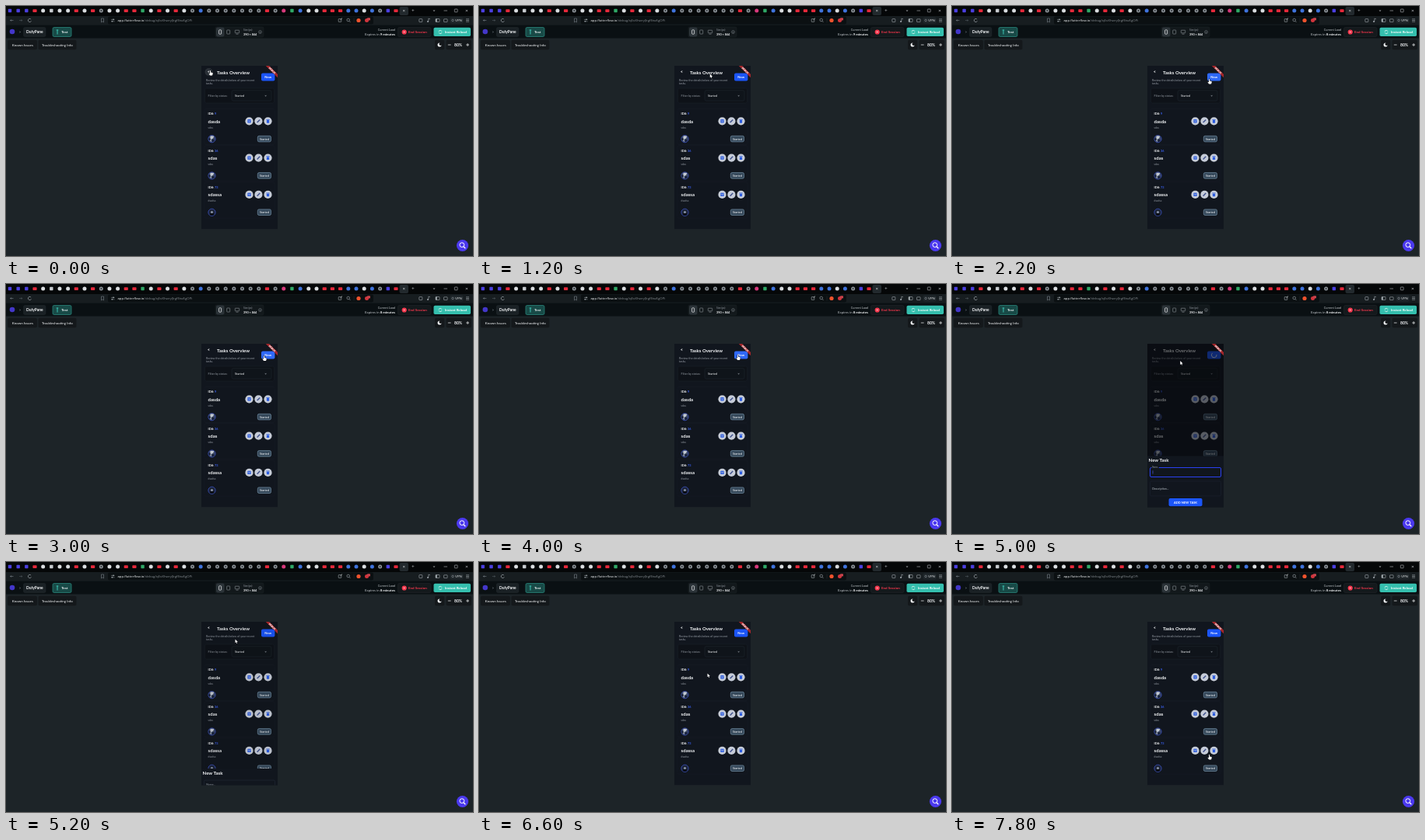
These frames come from a looping animation (600 px wide and 322 px high, 8 s). An HTML page with a canvas:

```html
<!DOCTYPE html>
<html lang="en">
<head>
<meta charset="utf-8">
<title>Tasks Overview</title>
<style>
html, body { margin: 0; width: 100%; height: 100%; overflow: hidden; background: #1d2428; }
canvas { display: block; width: 100vw; height: 100vh; }
</style>
</head>
<body>
<canvas id="stage"></canvas>
<script>
const W = 600, H = 322, LOOP = 8000, STEP = 200;
const canvas = document.getElementById('stage');
const c = canvas.getContext('2d');
const ratio = window.devicePixelRatio || 1;
canvas.width = W * ratio;
canvas.height = H * ratio;

const PHONE = { x: 251, y: 77, w: 98, h: 210.5 };
const SHEET_H = 66;
const BG = '#11161e', BLUE = '#1b55f8', GREY = '#949ba3', WHITE = '#f6f8fa';

// ---------- helpers ----------
function box(x, y, w, h, r, fill, line, lw = 0.5) {
  c.beginPath();
  c.roundRect(x, y, w, h, r);
  if (fill) { c.fillStyle = fill; c.fill(); }
  if (line) { c.strokeStyle = line; c.lineWidth = lw; c.stroke(); }
}

function disc(x, y, r, fill, line, lw = 0.6) {
  c.beginPath();
  c.arc(x, y, r, 0, 7);
  if (fill) { c.fillStyle = fill; c.fill(); }
  if (line) { c.strokeStyle = line; c.lineWidth = lw; c.stroke(); }
}

function path(points, line, lw = 0.7, fill) {
  c.beginPath();
  points.forEach(([x, y], i) => i ? c.lineTo(x, y) : c.moveTo(x, y));
  if (fill) { c.closePath(); c.fillStyle = fill; c.fill(); }
  if (line) { c.strokeStyle = line; c.lineWidth = lw; c.stroke(); }
}

// Draws text centred vertically on y and returns its right edge.
function text(str, x, y, size, color = WHITE, weight = 400, align = 'left', font = 'Lato') {
  c.font = `${weight} ${size}px "${font}", sans-serif`;
  c.textAlign = align;
  c.fillStyle = color;
  c.fillText(str, x, y + size * 0.35);
  return x + c.measureText(str).width;
}

function chevron(x, y, dx, dy, color, lw) {
  path([[x - dx - dy, y - dy - dx], [x + dx, y + dy], [x - dx + dy, y - dy + dx]], color, lw);
}

// ---------- browser ----------
const TABS = 'ppprwswwrwrgwwrrnwrwrwgbgggggggrgmnbwwrrrbbwbgpr';
const TINT = { p: '#4b3fe0', r: '#e5283a', w: '#d9dcdf', s: '#c8ccd0', b: '#3f73dc', g: '#8b9197', m: '#d8397c', n: '#2fa866' };

function drawTabs() {
  c.fillStyle = '#050708';
  c.fillRect(0, 0, W, 13);
  box(505.5, 1, 11.5, 11, 2, '#22292d');
  [...TABS].forEach((k, i) => {
    const x = i <= 36 ? 5 + 10.66 * i : 388.8 + 10.2 * (i - 36);
    if (k === 'r') box(x - 2.6, 4.2, 5.2, 3.8, 0.8, TINT.r);
    else if (k === 'p' || k === 's' || k === 'n') box(x - 2.2, 3.8, 4.4, 4.4, 0.8, TINT[k]);
    else disc(x, 6, 2.5, TINT[k]);
    if (k === 'g') disc(x, 6, 0.9, '#24292d');
  });
  text('×', 511.3, 6, 6, '#dfe2e4', 400, 'center');
  text('+', 523, 6, 6.5, '#b9bdc0', 400, 'center');
  chevron(550, 6, 0, 0.9, '#b9bdc0', 0.6);
  path([[562.5, 6], [567, 6]], '#b9bdc0', 0.6);
  box(576.3, 4, 3.8, 3.8, 0.5, null, '#b9bdc0', 0.6);
  text('×', 592, 6, 6.5, '#c6cacd', 400, 'center');
}

function drawToolbar() {
  const ink = '#a4abb0', dim = '#778086';
  c.fillStyle = '#171d20';
  c.fillRect(0, 13, W, 11.5);
  box(131, 13.6, 341, 10, 2, '#0b1012');
  path([[9.5, 18.5], [5.5, 18.5]], dim, 0.6);
  chevron(6.3, 18.5, -0.9, 0, dim, 0.6);
  path([[17, 18.5], [21, 18.5]], '#4e565b', 0.6);
  chevron(20.2, 18.5, 0.9, 0, '#4e565b', 0.6);
  c.beginPath();
  c.arc(30.5, 18.5, 2.1, 0.4, 5.6);
  c.strokeStyle = ink; c.lineWidth = 0.7; c.stroke();
  path([[122.5, 16], [125.5, 16], [125.5, 21], [124, 19.7], [122.5, 21], [122.5, 16]], dim, 0.6);
  path([[135, 17.4], [139.5, 17.4]], ink, 0.5);
  path([[135, 19.8], [139.5, 19.8]], ink, 0.5);
  disc(138, 17.4, 0.8, ink);
  disc(136.4, 19.8, 0.8, ink);
  const x = text('app.flutterflow.io', 143.5, 18.6, 4.25, WHITE, 500, 'left', 'Open Sans');
  text('/debug/qEoXhwrylJrgfEtwEgOPi', x, 18.6, 4.25, '#858c91', 400, 'left', 'Open Sans');
  box(427.2, 16.6, 3.6, 3.8, 0.4, null, ink, 0.6);
  path([[429.5, 18], [432, 15.6]], WHITE, 0.6);
  disc(439.7, 18, 1.8, null, ink);
  path([[441, 19.4], [442.5, 21]], ink, 0.6);
  path([[447, 15.5], [447, 21.5]], '#3a4146', 0.4);
  disc(453, 18.5, 2.6, '#f0532d');
  disc(463.5, 18.5, 2.5, '#d2343c');
  box(464, 15.2, 4, 3.4, 0.8, '#c9434c');
  box(530.8, 16.6, 4, 4, 0.6, null, ink, 0.6);
  disc(542, 20, 1, ink);
  path([[542.8, 20], [542.8, 16.2], [545, 16.8]], ink, 0.6);
  box(552, 16.5, 5, 4, 0.5, null, ink, 0.6);
  box(552, 16.5, 1.8, 4, 0.3, ink);
  box(562.5, 16.8, 4.6, 3.8, 0.5, null, ink, 0.6);
  box(570.5, 14.6, 17, 8, 2, '#1f262a');
  disc(574, 18.5, 1.3, null, ink, 0.5);
  text('VPN', 577, 18.6, 4.3, '#d8dbdd');
  [16.8, 18.5, 20.2].forEach(y => path([[591, y], [595, y]], ink, 0.6));
}

// ---------- test-mode header ----------
function drawHeader(minutes) {
  c.fillStyle = '#0a1013';
  c.fillRect(0, 24.5, W, 17);
  disc(8, 33, 3.3, '#4337c9');
  chevron(18, 33.5, 0.8, 0, '#69727a', 0.6);
  box(22.5, 27.5, 28.5, 12, 1.8, '#1a2125', '#262e33', 0.4);
  text('DutyPane', 26, 33.6, 4.9, WHITE, 700);
  box(60, 27.5, 24, 12, 1.8, '#184a47', '#2f9f92', 0.6);
  path([[66, 30.5], [66, 36.5]], '#42d3c1', 0.9);
  path([[64.7, 31], [67.3, 31]], '#42d3c1', 0.7);
  text('Test', 71.2, 33.6, 4.5, WHITE, 700);

  box(269, 27, 62, 13, 2, '#12181b', '#22292d', 0.4);
  box(270, 27.6, 10.5, 11.8, 1.8, '#2b3338');
  box(273.6, 30.8, 3, 5.4, 0.7, null, WHITE, 0.7);
  box(283.7, 31, 4, 5, 0.6, null, '#8d959a', 0.6);
  box(294.3, 31.2, 5.4, 3.6, 0.4, null, '#8d959a', 0.6);
  path([[295.5, 36.2], [298.5, 36.2]], '#8d959a', 0.6);
  text('Size (px)', 305, 30.7, 3.2, GREY);
  text('390 × 844', 305, 36.2, 3.8, WHITE, 700);
  disc(326.5, 33.5, 1.9, null, '#8d959a', 0.5);
  path([[326.5, 33], [326.5, 34.6]], '#8d959a', 0.5);

  text('Current Load', 500, 30.6, 3.9, '#c0c5c9', 400, 'right');
  const x = text('Expires in ', 461, 36.2, 4.4, '#c0c5c9');
  text(`${minutes} minutes`, x, 36.2, 4.4, WHITE, 700);

  box(503.5, 27.5, 42.5, 12, 1.8, '#14191c', '#2a2f33', 0.4);
  disc(511.7, 33.5, 3.1, '#f5364c');
  path([[510.7, 32.5], [512.7, 34.5]], '#fff', 0.6);
  path([[512.7, 32.5], [510.7, 34.5]], '#fff', 0.6);
  text('End Session', 517, 33.6, 4.5, '#f5364c', 700);
  box(549.5, 27.7, 47.5, 11.3, 1.8, '#35bfae');
  c.beginPath();
  c.arc(558, 33.5, 2.1, 0.3, 2.7);
  c.moveTo(555.9, 32.9);
  c.arc(558, 33.5, 2.1, 3.4, 5.9);
  c.strokeStyle = '#fff'; c.lineWidth = 0.7; c.stroke();
  text('Instant Reload', 564, 33.6, 4.4, '#fff', 700);
}

function drawTools() {
  const fill = '#14181b';
  box(2, 43.8, 38, 12.4, 2, fill);
  text('Known Issues', 7.7, 50, 4.5, WHITE);
  box(41.5, 43.8, 49, 12.4, 2, fill);
  text('Troubleshooting Info', 46, 50, 4.4, WHITE);
  box(551, 43.8, 12.3, 12.4, 2, fill);
  disc(557, 50, 2.5, WHITE);
  disc(558.4, 49, 2, fill);
  box(565.5, 43.8, 32.5, 12.4, 2, fill);
  path([[567.8, 50], [571.6, 50]], WHITE, 0.7);
  text('80%', 581, 50.1, 5.1, WHITE, 700, 'center');
  path([[591.2, 50], [595, 50]], WHITE, 0.7);
  path([[593.1, 48.1], [593.1, 51.9]], WHITE, 0.7);

  disc(586.5, 308.5, 7.6, '#4b39ef');
  disc(585.8, 307.7, 2.9, null, '#fff', 1);
  path([[588, 310], [590.3, 312.2]], '#fff', 1.2);
}

// ---------- phone ----------
const TASKS = [['9', 'dasda', 'sdas'], ['36', 'sdas', 'sdas'], ['73', 'sdassa', 'dsadsa']];

function drawAvatar(x, y, dark) {
  disc(x, y, 4.6, dark ? '#1c2437' : '#3a4660', '#3448a8', 1);
  c.save();
  c.beginPath();
  c.arc(x, y, 4.1, 0, 7);
  c.clip();
  if (dark) {
    disc(x, y + 3.6, 3, '#0a0d14');
    disc(x, y - 0.3, 1.5, '#8b95a6');
  } else {
    path([[x - 2, y - 4], [x + 3, y - 4], [x + 1.6, y - 0.6], [x - 1, y + 0.6], [x - 0.6, y + 4], [x - 2.2, y + 2]], null, 0, '#c2c9d2');
    disc(x - 3.4, y + 0.4, 1.7, '#141c30');
    disc(x + 1.6, y + 2.4, 1.9, '#1b2540');
  }
  c.restore();
}

function drawActions(y) {
  const ink = '#2a5be0', face = '#c6ccd8';
  [312.5, 324.4, 336.5].forEach(x => disc(x, y, 5.1, face));
  box(310.4, y - 2.2, 4.2, 4.4, 0.7, ink);
  path([[310.8, y - 0.5], [314.2, y - 0.5]], face, 0.5);
  path([[312.5, y - 0.5], [312.5, y + 1.6]], face, 0.5);
  path([[322.6, y + 1.8], [326.2, y - 1.8]], '#3d4f8c', 1.4);
  box(334.9, y - 1.2, 3.2, 3.6, 0.6, ink);
  path([[334.4, y - 1.9], [338.6, y - 1.9]], ink, 0.8);
}

function drawTask([id, name, note], i) {
  const y = 132.5 + 47.3 * i;
  box(255, y, 90, 46, 2, null, '#1a202a', 0.4);
  const x = text('ID#: ', 259.6, y + 6.6, 3.9, WHITE, 700);
  text(id, x, y + 6.6, 3.9, '#3a60f2', 700);
  text(name, 259.6, y + 15.9, 6, WHITE, 700);
  text(note, 259.6, y + 24.2, 3.3, GREY);
  drawActions(y + 15.8);
  drawAvatar(264.5, y + 38.7, i === 2);
  box(323.3, y + 34.8, 17.2, 7.6, 1.8, '#35485a', '#7e9db4', 0.6);
  text('Started', 331.9, y + 38.7, 3.9, WHITE, 400, 'center');
}

function drawPage(s) {
  c.fillStyle = BG;
  c.fillRect(PHONE.x, PHONE.y, PHONE.w, PHONE.h);
  if (s.overBack) disc(260.5, 85, 5, '#2a3037');
  chevron(260.4, 84.6, -0.9, 0, WHITE, 0.8);
  text('Tasks Overview', 271, 85.6, 6, WHITE, 700);
  text('Review the details below of your recent', 257, 96.2, 3.6, GREY);
  text('tasks.', 257, 100.2, 3.6, GREY);

  box(328, 86.5, 17.4, 10, 2, s.overNew ? '#2f69f8' : BLUE);
  if (s.busy) {
    c.beginPath();
    c.arc(336.7, 91.5, 3.3, s.t / 160, s.t / 160 + 4.2);
    c.strokeStyle = '#fff'; c.lineWidth = 0.8; c.stroke();
  } else {
    text('New', 336.7, 91.6, 4.2, '#fff', 700, 'center');
  }

  box(255.5, 106, 89, 19, 2, '#0e1218', '#1a2028', 0.5);
  text('Filter by status:', 259.6, 115.6, 3.7, GREY);
  box(290, 108.7, 51, 13.4, 2, '#0f141a', '#222a33', 0.5);
  text('Started', 294, 115.6, 3.8, WHITE);
  chevron(333.6, 115.6, 0, 0.7, GREY, 0.7);
  TASKS.forEach(drawTask);
}

function drawSheet(open, focused) {
  const y = PHONE.y + PHONE.h - SHEET_H * open;
  c.fillStyle = BG;
  c.fillRect(PHONE.x, y, PHONE.w, SHEET_H + 1);
  text('New Task', 252.6, y + 5.6, 6, WHITE, 700);
  box(254.5, y + 15, 91, 12, 1.5, null, focused ? '#2a40f0' : '#222a36', focused ? 1 : 0.6);
  if (focused) {
    box(256.5, y + 14, 9.5, 2, 0, BG);
    text('Name...', 257.2, y + 15, 2.7, GREY);
    path([[258, y + 18.8], [258, y + 23]], '#5567f0', 0.6);
  } else {
    text('Name...', 257.2, y + 20.8, 3.6, GREY);
  }
  box(254.5, y + 32.5, 91, 19, 1.5, null, '#1d2430', 0.6);
  text('Description...', 257.2, y + 42, 3.6, GREY, 700);
  box(278.5, y + 54.5, 43, 10.2, 2, BLUE);
  text('ADD NEW TASK', 300, y + 59.7, 4, '#fff', 700, 'center');
}

function drawBanner() {
  c.save();
  c.translate(342, 83);
  c.rotate(Math.PI / 4);
  c.fillStyle = '#a5262a';
  c.fillRect(-14, -1.6, 28, 3.2);
  text('DEBUG', 0, 0, 3.2, '#fff', 900, 'center');
  c.restore();
}

// ---------- pointer ----------
const PATH = [
  [0, 262.5, 83], [600, 262.5, 83], [1800, 331, 92], [2200, 330.5, 94], [3000, 331.5, 92.5],
  [4000, 332.5, 91.3], [4400, 286.5, 97], [5200, 294.5, 99.5], [6000, 294.5, 99.5],
  [6600, 293.5, 143.5], [6800, 293.5, 143.5], [7800, 330.5, 248]
];
const HAND = [[-0.4, 0], [0.5, 0], [0.6, 2.4], [3.1, 3], [3.2, 4.6], [2.5, 6.6], [-0.4, 6.6],
  [-2, 4.2], [-1.5, 3.6], [-0.5, 4.4], [-0.4, 0]];
const ARROW = [[0, 0], [0, 4.8], [1.1, 3.8], [1.9, 5.5], [2.6, 5.2], [1.9, 3.5], [3.4, 3.4], [0, 0]];

function pointerAt(t) {
  const i = Math.max(1, PATH.findIndex(k => k[0] >= t));
  const [t0, x0, y0] = PATH[i - 1], [t1, x1, y1] = PATH[i];
  const u = (t - t0) / (t1 - t0), e = u * u * (3 - 2 * u);
  return [x0 + (x1 - x0) * e, y0 + (y1 - y0) * e];
}

const inside = ([x, y], l, t, r, b) => x >= l && x <= r && y >= t && y <= b;

function drawPointer([x, y], shape) {
  c.save();
  c.translate(x, y);
  c.lineJoin = 'round';
  path(shape, '#0a0c10', 0.9);
  path(shape, null, 0, '#fff');
  c.restore();
}

// ---------- timeline ----------
function sheetAt(t) {
  if (t < 4200 || t >= 5400) return 0;
  if (t < 4400) return 0.55;
  return t < 5200 ? 1 : 0.325;
}

function draw(t) {
  const open = sheetAt(t), p = pointerAt(t);
  const overBack = inside(p, 255, 79, 266, 90);
  const overNew = !open && inside(p, 328, 86, 346, 97);
  const overAction = !open && TASKS.some((_, i) => inside(p, 307, 142 + 47.3 * i, 342, 154 + 47.3 * i));

  c.setTransform(ratio, 0, 0, ratio, 0, 0);
  c.fillStyle = '#1d2428';
  c.fillRect(0, 0, W, H);
  drawTabs();
  drawToolbar();
  drawHeader(t < 1400 ? 9 : 8);
  drawTools();

  c.save();
  c.beginPath();
  c.rect(PHONE.x, PHONE.y, PHONE.w, PHONE.h);
  c.clip();
  drawPage({ t, overBack, overNew, busy: t >= 4200 && t < 5200 });
  if (open) {
    c.fillStyle = `rgba(6,8,12,${0.57 * open * open})`;
    c.fillRect(PHONE.x, PHONE.y, PHONE.w, PHONE.h);
    drawSheet(open, t < 5200);
  }
  drawBanner();
  c.restore();
  drawPointer(p, overBack || overNew || overAction ? HAND : ARROW);
}

function tick(now) {
  draw(Math.floor((now % LOOP) / STEP) * STEP);
  requestAnimationFrame(tick);
}
draw(0);
requestAnimationFrame(tick);
</script>
</body>
</html>
```
